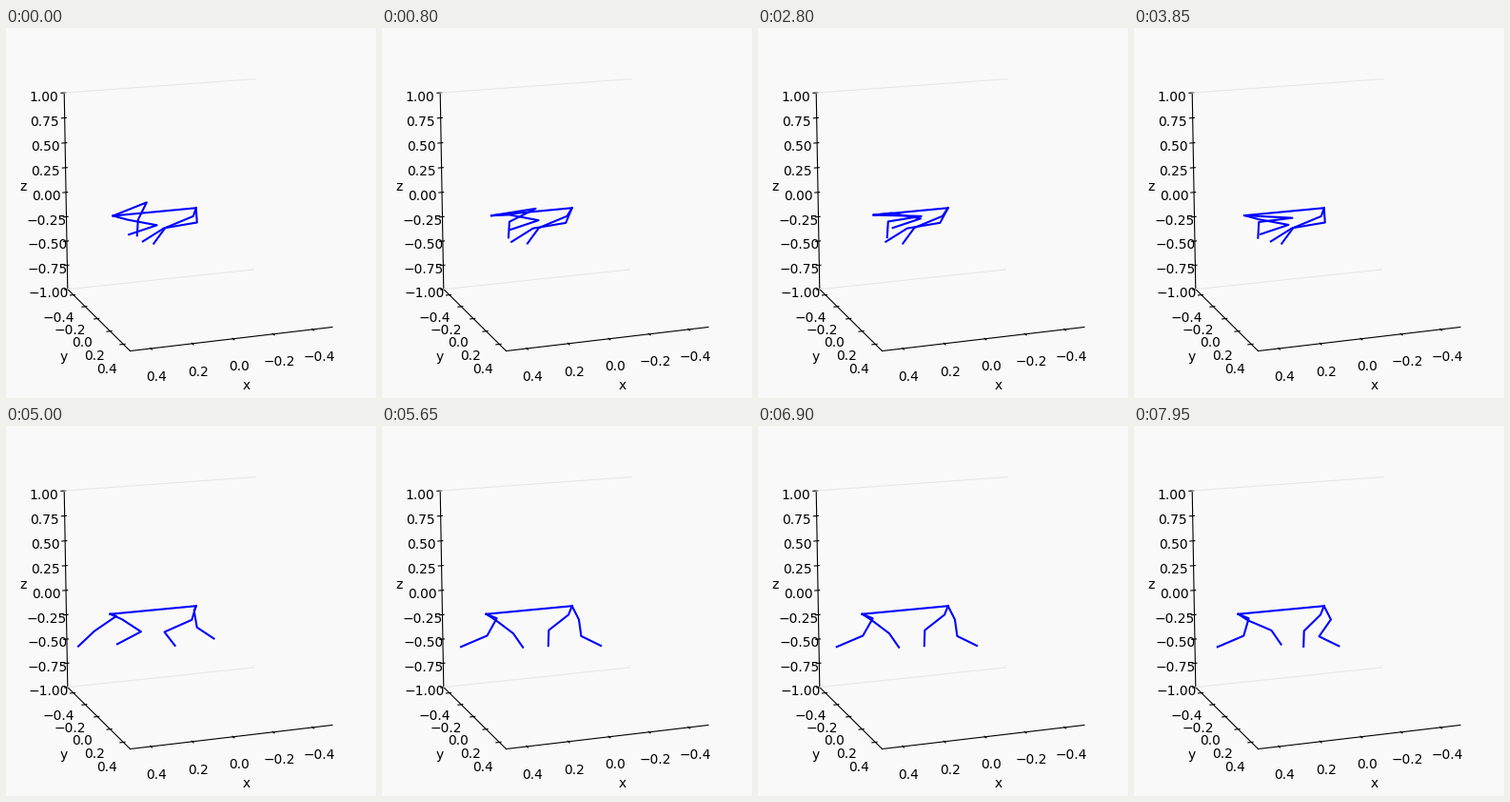
Write a matplotlib script that moves like this. It is 389 px wide and 389 px high and loops after 8 s.

```python
import numpy as np
import matplotlib.pyplot as plt
from matplotlib.animation import FuncAnimation

SIZE, DPI = 389, 100
STEP, FRAMES = 50, 160
BACK = "#f9f9f9"

THIGH, SHIN = 0.168, 0.155
POSE_TIMES = [3850, 5000, 5650]
GAIT_PERIOD = 1700

# Per leg: crouching, landing and standing pose, each as
# (hip reach, hip angle, thigh angle, shin angle); 0 is forward, 90 is down.
# "sway" turns the hip while crouching, "swing" the thigh while standing.
LEGS = [
    dict(rear=True, sway=0, swing=5,
         poses=[(0.25, 18, 180, 92), (0.04, 40, 132, 121), (0.073, 45, 104, 147)]),
    dict(rear=True, sway=-50, swing=8,
         poses=[(0.088, 36, 29, 155), (0.085, 47, 56, 140), (0.085, 56, 54, 72)]),
    dict(rear=False, sway=24, swing=-15,
         poses=[(0.145, 88, 172, 134), (0.047, 102, 85, 56), (0.145, 76, 96, 49)]),
    dict(rear=False, sway=14, swing=4,
         poses=[(0.08, 100, 148, 112), (0.135, 99, 146, 70), (0.085, 102, 124, 91)]),
]
# The first leg starts raised and sinks into its crouch
RAISED = np.array([-0.055, -49, -75, 0])


def make_axes():
    fig = plt.figure(figsize=(SIZE / DPI, SIZE / DPI), dpi=DPI, facecolor=BACK)
    ax = fig.add_axes([0, 0, 1, 1], projection="3d", facecolor=BACK)
    ax.view_init(elev=15, azim=70)
    ax.set_box_aspect((1, 1, 1), zoom=0.95)
    ax.grid(False)
    for axis in (ax.xaxis, ax.yaxis, ax.zaxis):
        axis.pane.set_visible(False)
    for z in (-1, 1):
        ax.plot([0.5, -0.5], [-0.5, -0.5], [z, z], color="#e6e6e6", lw=0.75)
    ax.set(xlabel="x", ylabel="y", zlabel="z",
           xticks=np.arange(-2, 3) / 5, yticks=np.arange(-2, 3) / 5,
           zticks=np.arange(-4, 5) / 4,
           xlim=(-0.5, 0.5), ylim=(-0.5, 0.5), zlim=(-1, 1))
    return fig, ax


def rear_x(t):
    return np.interp(t, [0, 2900, 5000], [0.416, 0.372, 0.43])


def leg_pose(leg, t):
    pose = np.array([np.interp(t, POSE_TIMES, track) for track in zip(*leg["poses"])])
    if leg is LEGS[0]:
        pose += RAISED * np.exp(-t / 1200)
    crouch = min(t / POSE_TIMES[0], 1)
    pose[1] += leg["sway"] * np.sin(np.pi * crouch)
    gait = max(t - POSE_TIMES[1], 0) / GAIT_PERIOD
    pose[2] += leg["swing"] * np.sin(2 * np.pi * gait)
    return pose


def leg_path(leg, t):
    reach, *angles = leg_pose(leg, t)
    lengths = np.array([reach, THIGH, SHIN])
    angles = np.radians(angles)
    start = rear_x(t) if leg["rear"] else 0
    x = start - np.cumsum([0, *(lengths * np.cos(angles))])
    z = -np.cumsum([0, *(lengths * np.sin(angles))])
    return x, np.zeros(4), z


fig, ax = make_axes()
body, *limbs = [ax.plot([], [], [], color="blue", lw=1.5)[0]
                for _ in range(len(LEGS) + 1)]


def update(frame):
    t = frame * STEP
    body.set_data_3d([rear_x(t), 0], [0, 0], [0, 0])
    for leg, line in zip(LEGS, limbs):
        line.set_data_3d(*leg_path(leg, t))
    return [body, *limbs]


anim = FuncAnimation(fig, update, frames=FRAMES, interval=STEP,
                     repeat=True, repeat_delay=0)
plt.show()
```
